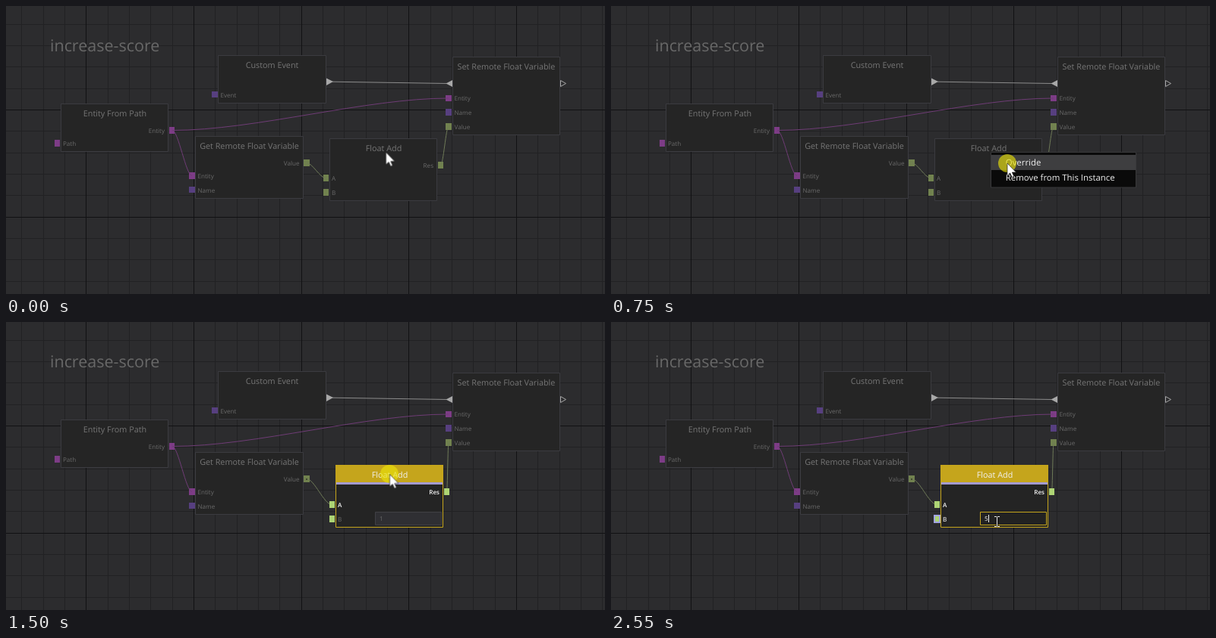
Write an HTML page that moves like this. It is 789 px wide and 381 px high and loops after 3.15 s.

```html
<!DOCTYPE html>
<html lang="en">
<head>
<meta charset="utf-8">
<title>Node graph override</title>
<style>
html, body { margin: 0; width: 100%; height: 100%; overflow: hidden; background: #2c2c2e; }
svg { display: block; width: 789px; height: 381px; }
text { font: 10.8px "Open Sans", "Noto Sans", sans-serif; fill: #767676; text-rendering: geometricPrecision; }
.mid { text-anchor: middle; }
.end { text-anchor: end; }
.small text, text.small { font-size: 8.1px; fill: #6a6a6a; }
.heading { font-size: 21.5px; fill: #686868; }
.menu text { font-size: 11.4px; fill: #f0f0f0; }
#node text.lit, text.lit { fill: #f2f2f2; }
.strong { font-weight: 600; }

.grid { fill: none; shape-rendering: crispEdges; }
.minor { stroke: #212123; }
.major { stroke: #111113; }
.box { fill: #252525; stroke: #3b3b40; }
.wire { fill: none; stroke-width: 1; }
.purple { stroke: #6f3c76; }
.olive { stroke: #6f7b58; }
.pin-purple { fill: #7d3c86; }
.pin-indigo { fill: #573f80; }
.pin-olive { fill: #71824f; }
.pin-green { fill: #add474; }

/* One tick is 150 ms, 1/21 of the loop. */
.a { animation: 3150ms step-end infinite; }
.plain { animation-name: plain; }
.override { animation-name: override; }
.rest { animation-name: rest; }
.moved { animation-name: moved; }
.menu { animation-name: menu; }
.pick { animation-name: pick; }
.click { animation-name: click; }
.arrow { animation-name: arrow; }
.beam { animation-name: beam; }
#node { animation-name: drop; }
.hover { animation-name: hover; }
.focus { animation-name: focus; }
.old { animation-name: old; }
.old-lit { animation-name: old-lit; }
.empty { animation-name: empty; }
.typed { animation-name: typed; }

@keyframes plain { 0% { visibility: visible } 28.571%, 100% { visibility: hidden } }
@keyframes override { 0% { visibility: hidden } 28.571%, 100% { visibility: visible } }
@keyframes rest { 0% { visibility: visible } 47.619%, 100% { visibility: hidden } }
@keyframes moved { 0% { visibility: hidden } 47.619%, 100% { visibility: visible } }
@keyframes menu { 0%, 28.571%, 100% { visibility: hidden } 9.523% { visibility: visible } }
@keyframes pick { 0%, 28.571%, 100% { visibility: hidden } 19.047% { visibility: visible } }
@keyframes hover { 0%, 71.428%, 100% { visibility: hidden } 61.904% { visibility: visible } }
@keyframes focus { 0% { visibility: hidden } 71.428%, 100% { visibility: visible } }
@keyframes old { 0%, 71.428%, 100% { visibility: hidden } 28.571% { visibility: visible } }
@keyframes old-lit { 0%, 76.19%, 100% { visibility: hidden } 71.428% { visibility: visible } }
@keyframes empty { 0%, 80.952%, 100% { visibility: hidden } 76.19% { visibility: visible } }
@keyframes typed { 0% { visibility: hidden } 80.952%, 100% { visibility: visible } }
@keyframes drop { 0% { transform: none } 47.619%, 100% { transform: translate(8px, 14px) } }
@keyframes click {
  0%, 14.285%, 28.571%, 52.38%, 71.428%, 100% { visibility: hidden; transform: none }
  4.761% { visibility: visible; transform: translate(500px, 193px) }
  23.809% { visibility: visible; transform: translate(522px, 208px) }
  42.857% { visibility: visible; transform: translate(497px, 187px) }
  47.619% { visibility: visible; transform: translate(505px, 201px) }
  66.666% { visibility: visible; transform: translate(506px, 263px) }
}
@keyframes arrow {
  0% { visibility: visible; transform: translate(500.5px, 193.5px) }
  19.047% { visibility: visible; transform: translate(517.5px, 203.5px) }
  23.809% { visibility: visible; transform: translate(522px, 208px) }
  28.571% { visibility: visible; transform: translate(522.5px, 208.5px) }
  33.333% { visibility: visible; transform: translate(500px, 194px) }
  38.095% { visibility: visible; transform: translate(497px, 187px) }
  47.619% { visibility: visible; transform: translate(505.5px, 201.5px) }
  52.38% { visibility: visible; transform: translate(502px, 215px) }
  57.142%, 100% { visibility: hidden; transform: none }
}
@keyframes beam {
  0% { visibility: hidden; transform: translate(508px, 259px) }
  57.142% { visibility: visible; transform: translate(508px, 259px) }
  61.904%, 100% { visibility: visible; transform: translate(508px, 264px) }
}
</style>
</head>
<body>
<svg viewBox="0 0 789 381">
  <path class="grid minor" id="minor"/>
  <path class="grid major" id="major"/>
  <text class="heading" x="58" y="59.500">increase-score</text>

  <g class="box">
    <path d="M72.500 129.500h141v63h-141zM279.500 65.500h142v63h-142zM588.500 67.500h141v103h-141zM249.500 172.500h142v82h-142z"/>
    <path class="a plain" d="M426.500 175.500h141v82h-141z"/>
  </g>

  <g class="mid">
    <text x="143.500" y="146">Entity From Path</text>
    <text x="350.500" y="82">Custom Event</text>
    <text x="659" y="84">Set Remote Float Variable</text>
    <text x="320.500" y="189">Get Remote Float Variable</text>
    <text class="a plain" x="497.500" y="192">Float Add</text>
  </g>

  <g class="small">
    <text x="75" y="185">Path</text>
    <text class="end" x="209" y="168">Entity</text>
    <text x="282.500" y="121">Event</text>
    <text x="590.500" y="125">Entity</text>
    <text x="590.500" y="144">Name</text>
    <text x="590.500" y="163">Value</text>
    <text x="252.500" y="228">Entity</text>
    <text x="252.500" y="247">Name</text>
    <text class="end" x="386.500" y="211">Value</text>
    <g class="a plain">
      <text x="429" y="231">A</text>
      <text x="429" y="250">B</text>
      <text class="end" x="563" y="214">Res</text>
    </g>
  </g>

  <path class="pin-purple" d="M64 177h7v9h-7zM215 160h7v9h-7zM579 118h8v8h-8zM241 220h8v9h-8z"/>
  <path class="pin-indigo" d="M271 113h8v8h-8zM579 136h8v9h-8zM241 239h8v8h-8z"/>
  <path class="pin-olive" d="M579 155h8v9h-8zM392 203h8v9h-8z"/>
  <path class="a plain pin-olive" d="M418 223h7v9h-7zM418 242h7v9h-7zM569 206h7v9h-7z"/>

  <path class="wire" stroke="#8c8c8c" d="M430 100.200L581 102.500"/>
  <path fill="#a8a8a8" d="M422 95.500l9 4.500l-9 5zM588 98l-8.500 4.500l8.500 4.500z"/>
  <path fill="none" stroke="#a8a8a8" d="M730.500 98.500l7 4l-7 4z"/>
  <path class="wire purple" d="M219 164.500C328 164.500 474 122 583 122M219 164.500C227 164.500 237 224.500 245 224.500"/>
  <path class="a rest wire olive" d="M396 207.500C403.500 207.500 413.500 227.500 421 227.500M572.500 210.500C576 210.500 579.500 159.500 583 159.500"/>
  <g class="a moved">
    <path class="wire olive" d="M396 207.500C406 207.500 419 241.500 429 241.500M580.500 224.500C581.500 224.500 582 159.500 583 159.500"/>
    <path fill="#41482f" d="M395 207h2v2h-2z"/>
  </g>

  <g id="node" class="a">
    <g class="a override">
      <path fill="#242424" stroke="#c5a51c" d="M426.500 175.500h141v82h-141z"/>
      <path fill="#c5a51c" d="M426 175h142v23h-142z"/>
      <path fill="#a49bd0" d="M427 198h140v3h-140z"/>
      <text class="mid lit" x="497.500" y="192">Float Add</text>
      <path class="pin-green" d="M418 223h7v9h-7zM418 242h7v9h-7zM569 206h7v9h-7z"/>
      <text class="small lit strong" x="429" y="231">A</text>
      <text class="small lit strong end" x="563" y="214">Res</text>
      <path fill="#2f2f33" stroke="#404045" d="M478.500 237.500h87v17h-87z"/>
    </g>
    <path class="a hover" fill="#29292b" stroke="#6c6c70" d="M478.500 237.500h87v17h-87z"/>
    <path class="a focus" fill="#222" stroke="#c5a51c" d="M478.500 237.500h87v17h-87z"/>
    <text class="a old small" x="484" y="249">1</text>
    <g class="a old-lit">
      <text class="small lit" x="484" y="249">1</text>
      <path fill="#f2f2f2" d="M489 241h1v10h-1z"/>
    </g>
    <path class="a empty" fill="#f2f2f2" d="M485 241h1v10h-1z"/>
    <g class="a typed">
      <text class="small lit" x="484" y="249">5</text>
      <path fill="#f2f2f2" d="M489 241h1v10h-1z"/>
      <path fill="#add474" stroke="#a3a5e0" stroke-width="2" d="M418 242h7v9h-7z"/>
    </g>
    <text class="a override small" x="429" y="250">B</text>
    <text class="a typed small lit" x="429" y="250">B</text>
  </g>

  <g class="a menu">
    <path fill="#0a0a0a" stroke="#39393b" d="M500.500 193.500h191v46.500h-191z"/>
    <path class="a pick" fill="#3e3e40" d="M501 197h190v20h-190z"/>
    <text x="519.800" y="211">Override</text>
    <text x="519.800" y="231">Remove from This Instance</text>
  </g>

  <circle class="a click" r="12" fill="#ebe208" fill-opacity=".63"/>
  <path class="a arrow" fill="#fff" stroke="#222" stroke-width=".7" d="M0 0V16.300L3.700 12.900L6.200 18.500L8.700 17.400L6.300 12H11.500Z"/>
  <g class="a beam" fill="none">
    <path stroke="#111" stroke-width="2.500" d="M.5 -6V6"/>
    <path stroke="#f4f4f4" d="M-3 -6.500H0M1 -6.500H4M.5 -6V6M-3 6.500H0M1 6.500H4"/>
  </g>
</svg>
<script>
const cell = 28.33;
const lines = { minor: "", major: "" };
for (let i = -10; i < 21; i++) {
  const x = Math.round(247 + i * cell) + 0.5;
  const y = Math.round(137 + i * cell) + 0.5;
  lines[i % 5 ? "minor" : "major"] += `M${x} 0V381M0 ${y}H789`;
}
for (const id in lines) document.getElementById(id).setAttribute("d", lines[id]);
</script>
</body>
</html>
```
